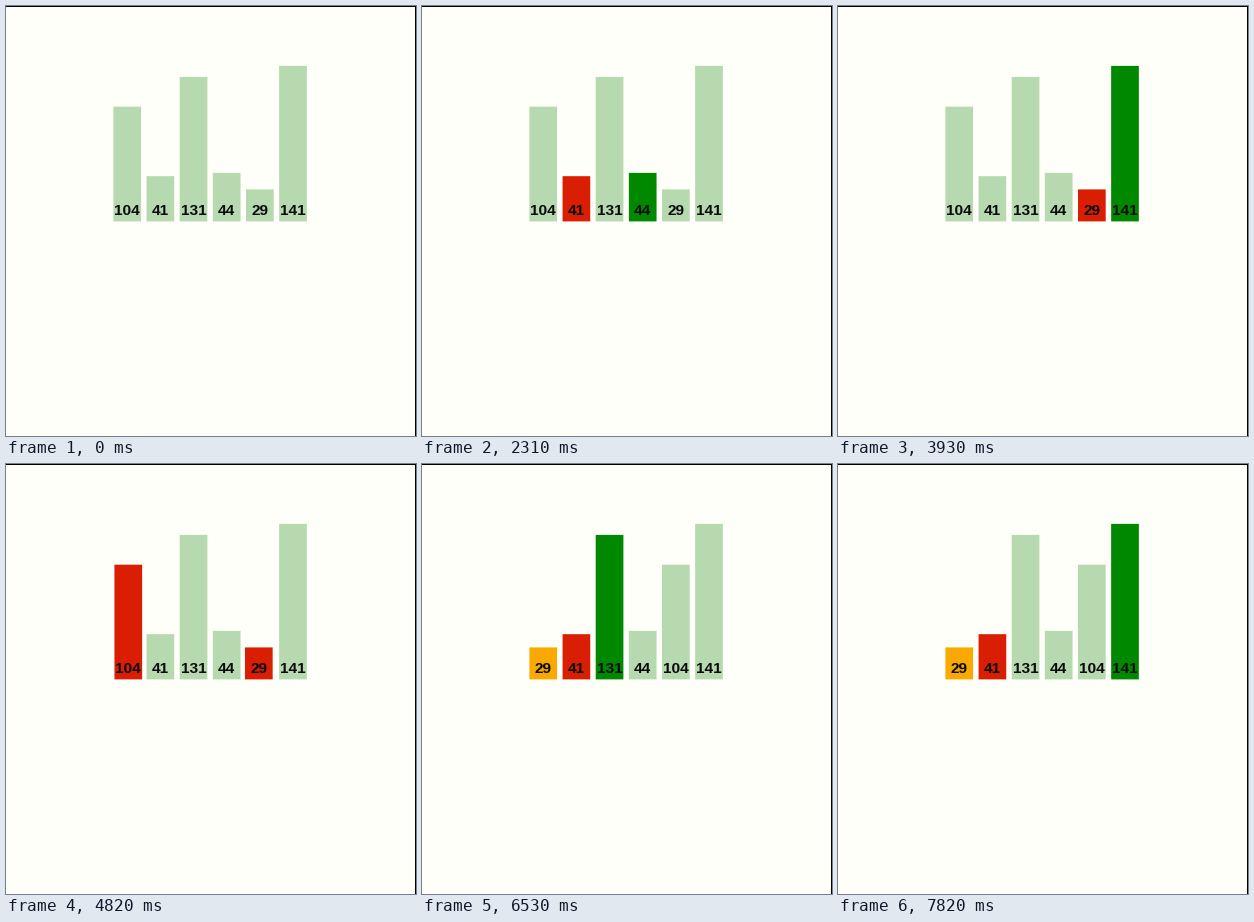
A matplotlib script that plays this animation: 410 by 430 pixels, repeating every 8000 ms.

```python
import matplotlib.pyplot as plt
from matplotlib.animation import FuncAnimation
from matplotlib.patches import Rectangle

W, H, DPI = 410, 430, 80
LOOP, STEP = 8000, 20

PAPER = "#fffffa"
LIGHT, RED, GREEN, ORANGE = "#b6d9b0", "#da1e04", "#008800", "#f9a900"

VALUES = [104, 41, 131, 44, 29, 141]
LEFT, PITCH, BAR_W = 107.4, 33.15, 27.7
BASE, UNIT = 215.4, 1.103
TEXT_PX, TEXT_Y = 15.4, 209
SWAP_START, SWAP_TIME = 4770, 480

# Start time and the highlighted values of every selection sort step
STEPS = [
    (0, {}),
    (280, {104: RED}),
    (810, {104: RED, 41: GREEN}),
    (1300, {41: RED}),
    (1820, {41: RED, 131: GREEN}),
    (2310, {41: RED, 44: GREEN}),
    (2800, {41: RED, 29: GREEN}),
    (3280, {29: RED}),
    (3810, {29: RED, 141: GREEN}),
    (4300, {29: RED, 104: RED}),
    (5310, {29: ORANGE}),
    (5800, {29: ORANGE, 41: RED}),
    (6280, {29: ORANGE, 41: RED, 131: GREEN}),
    (6810, {29: ORANGE, 41: RED, 44: GREEN}),
    (7300, {29: ORANGE, 41: RED, 104: GREEN}),
    (7780, {29: ORANGE, 41: RED, 141: GREEN}),
]


def ease(p):
    """Cubic in-out, clamped to 0..1."""
    p = min(max(p, 0), 1)
    return 4 * p ** 3 if p < 0.5 else 1 - 4 * (1 - p) ** 3


fig = plt.figure(figsize=(W / DPI, H / DPI), dpi=DPI, facecolor=PAPER)
ax = fig.add_axes([0, 0, 1, 1])
ax.set_xlim(0, W)
ax.set_ylim(H, 0)
ax.axis("off")

for x, y, w, h in [(0, 0, W, 1), (W - 1, 0, 1, H)]:
    ax.add_patch(Rectangle((x, y), w, h, color="black", lw=0))

bars, labels = [], []
for i, value in enumerate(VALUES):
    height = value * UNIT
    bar = Rectangle((0, BASE - height), BAR_W, height, lw=0,
                    zorder=2 + i, snap=False)
    bars.append(ax.add_patch(bar))
    labels.append(ax.text(0, TEXT_Y, str(value), ha="center", va="baseline",
                          family="Liberation Sans", weight="bold",
                          size=TEXT_PX * 72 / DPI, color="#0a0a0a",
                          zorder=2.5 + i))


def draw(frame):
    t = frame * STEP + STEP / 2
    marks = [m for start, m in STEPS if start <= t][-1]
    shift = 4 * ease((t - SWAP_START) / SWAP_TIME)
    moved = {104: shift, 29: -shift}
    for i, value in enumerate(VALUES):
        x = LEFT + PITCH * (i + moved.get(value, 0))
        bars[i].set_x(x)
        bars[i].set_facecolor(marks.get(value, LIGHT))
        labels[i].set_x(x + BAR_W / 2)
    return bars + labels


anim = FuncAnimation(fig, draw, frames=LOOP // STEP, interval=STEP,
                     init_func=lambda: draw(0), repeat=True, repeat_delay=0)
plt.show()
```
